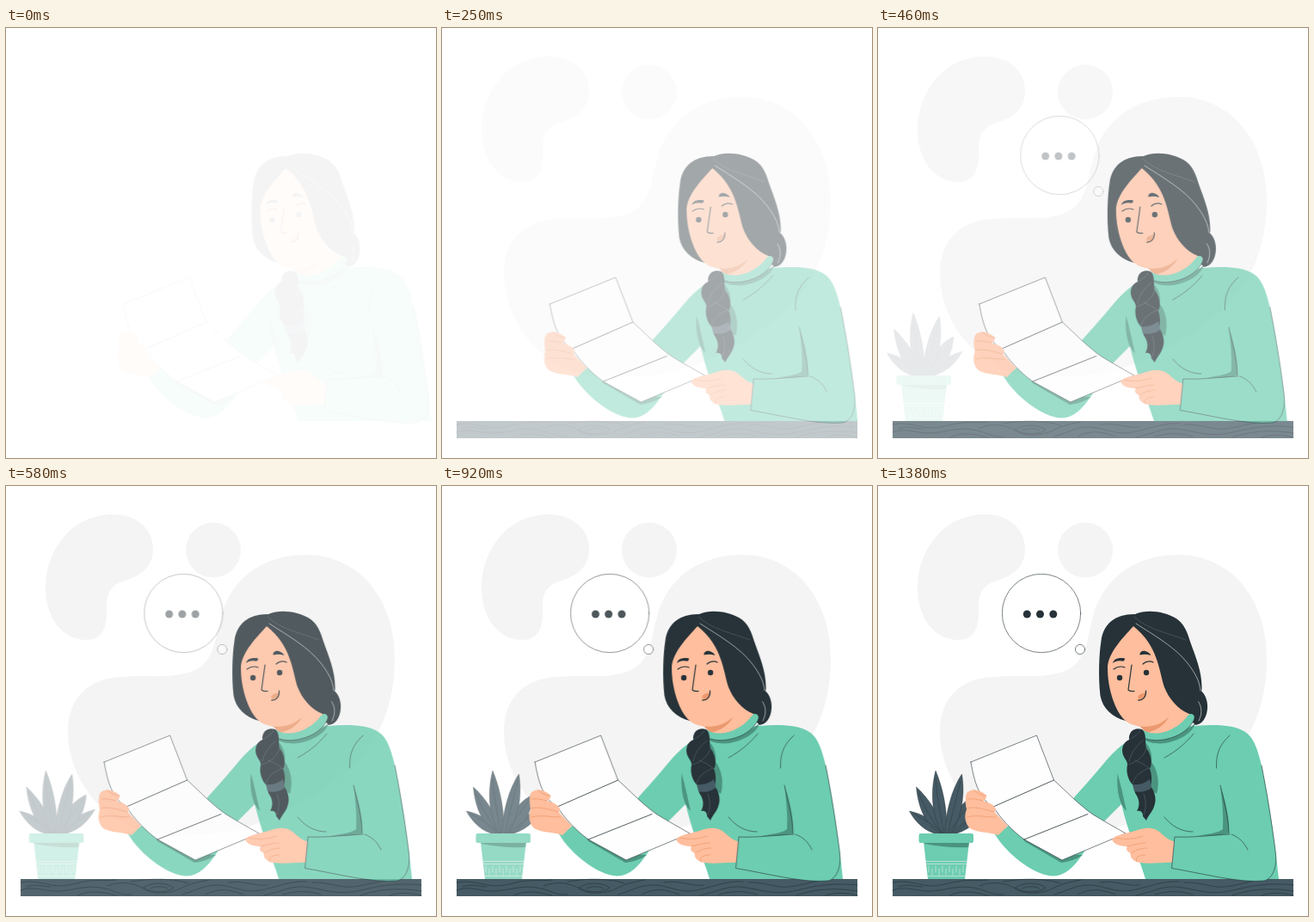
These frames come from a looping animation (500 px wide and 500 px high, 1.43 s). An HTML page:

```html
<!DOCTYPE html>
<html lang="en">
<head>
<meta charset="utf-8">
<title>Reading a letter</title>
<style>
  html, body { margin: 0; width: 100%; height: 100%; overflow: hidden; background: #fff; }
  svg { display: block; width: 100%; height: 100%; }

  .scene > g { animation: 1430ms linear infinite both; }
  .scene > .room { animation-name: appear; }
  .scene > .woman { animation-name: woman; }
  .scene > .bubble { animation-name: bubble; }
  .scene > .plant { animation-name: plant; }

  @keyframes appear {
    0%, 5.3% { opacity: 0; }
    43.2%, 100% { opacity: 1; }
  }
  /* starts 30 ms into a one second ease-out */
  @keyframes woman {
    0% { opacity: .05; transform: translateX(28.5px); animation-timing-function: cubic-bezier(.128, .213, .626, 1); }
    67.83%, 100% { opacity: 1; transform: none; }
  }
  @keyframes bubble {
    0%, 19.23% { opacity: 0; transform: translateX(30px); animation-timing-function: ease-out; }
    89.16%, 100% { opacity: 1; transform: none; }
  }
  @keyframes plant {
    0%, 26.57% { opacity: 0; transform: translateX(-30px); animation-timing-function: ease-out; }
    96.5%, 100% { opacity: 1; transform: none; }
  }

  .blob { fill: #f4f4f4; }
  .slate { fill: #455a64; }
  .ink { fill: #263238; }
  .green { fill: #6ccdb0; }
  .shade { fill: #4a947f; }
  .skin { fill: #ffbe9d; }
  .blush { fill: #eb996e; }
  .paper { fill: #fefefe; }
  .line { fill: none; stroke: #263238; stroke-width: .6; stroke-linecap: round; stroke-linejoin: round; }
  .fold { stroke-width: .8; }
  .bold { stroke-width: 1.2; }
  .crease { stroke: #eb996e; stroke-width: .7; }
  .strand { stroke: #56666e; }
  .light { stroke: #e8ecee; }
</style>
</head>
<body>
<svg class="scene" viewBox="0 0 500 500">
  <g class="room">
    <g class="blob">
      <path d="M124 33C153 33 172 51 171 75C170 98 152 106 136 111C121 116 117 126 117 140C118 160 115 179 93 179C65 179 46 152 46 119C46 75 76 33 124 33Z"/>
      <circle cx="241" cy="74.5" r="32"/>
      <path d="M349 80C411 80 452 132 452 200C452 285 410 335 330 375C285 402 230 409 180 405C120 400 72 346 72 285C72 246 97 224 132 222C163 220 192 224 215 216C243 206 243 178 250 152C260 112 294 80 349 80Z"/>
    </g>
    <path class="slate" d="M17 457H483V477H17Z"/>
    <path class="line" d="M17 461C40 456 52 470 78 463S112 460 128 458M17 470C34 464 44 472 62 471S92 464 110 467S130 476 146 475M24 466C34 462 42 466 52 466M84 476C100 468 118 474 128 476M118 465C136 458 150 463 158 467C168 476 192 474 203 468C214 462 226 460 236 458M160 467C166 461 186 460 195 467C190 473 168 474 160 467ZM168 468C174 465 182 465 188 468M146 460C166 456 196 456 212 462M205 475C222 470 230 464 246 464S276 474 296 470S330 459 350 460M232 475C250 466 262 470 276 475M258 461C276 458 290 466 304 464M300 476C320 472 330 465 346 466S380 475 402 472S440 460 483 464M356 461C376 460 388 468 404 466S430 460 440 459M322 475C340 470 352 471 366 475M412 476C430 470 452 466 483 471M446 476C458 472 470 473 483 476"/>
  </g>

  <g class="bubble">
    <g class="line" style="fill:#fff">
      <circle cx="190" cy="148" r="45.7"/>
      <circle cx="235" cy="190" r="5.6"/>
    </g>
    <g class="ink">
      <circle cx="173.3" cy="149" r="4.5"/>
      <circle cx="188.5" cy="149" r="4.5"/>
      <circle cx="203.800" cy="149" r="4.5"/>
    </g>
  </g>

  <g class="plant">
    <g class="line" style="fill:#455a64;stroke-width:.4">
      <path d="M78 406C58 406 44 392 36.500 378C52 381 68 390 78 406Z"/>
      <path d="M80 406C94 388 110 380 124 376C116 391 104 402 84 406Z"/>
      <path d="M76 406C56 396 47 376 44.500 350C58 362 72 382 78 406Z"/>
      <path d="M80 406C84 384 98 366 114 359C112 382 102 398 84 406Z"/>
      <path d="M77 406C63 388 60 358 67 331C76 352 82 382 79 406Z"/>
      <path d="M78 406C78 380 86 352 97.500 335C102 362 96 388 84 406Z"/>
      <path d="M76 405C64 393 52 387 41 381M75 405C62 388 52 370 47 356M77 405C72 380 68 358 67 340M81 405C86 382 92 360 96 343M82 405C92 388 102 376 111 364M84 405C96 394 108 386 118 380"/>
    </g>
    <path class="green" d="M53 414H106L101 457H58Z"/>
    <path class="shade" d="M53 414H106L105 420C88 421 70 419 54 416Z"/>
    <rect class="green" x="47.5" y="404" width="63.5" height="11" rx="2"/>
    <g class="line light">
      <path d="M56 436.500H103M56 439.500H103M58 453.500H101"/>
      <path d="M59 442V449M63 445V452M67 442V449M71 445V452M75 442V449M79 445V452M83 442V449M87 445V452M91 442V449M95 445V452M99 442V449"/>
    </g>
  </g>

  <g class="woman">
    <!-- far arm and body -->
    <path class="green" d="M294 295C272 306 262 326 229 361L196 405L152 395L136 405C150 428 180 452 203 453.500C217 454 228 443 238 428L262 391L285 368L300 310Z"/>
    <path class="shade" d="M166 405L170 413L213 438C222 437 231 434 238 429L214 428Z"/>
    <path class="green" d="M294 295C312 286 340 280 368 279C390 277 414 277 427 286C438 293 442 309 446 325C454 362 462 415 466 457H311C302 428 286 392 279 350C276 325 282 304 294 295Z"/>
    <path class="shade" d="M278.500 334C277 355 281 371 289 378C286 365 283 350 278.500 334Z"/>
    <path class="shade" d="M311 293C330 297 352 290 369 276C366 286 352 296 334 299C326 300 316 299 311 296Z"/>
    <path class="shade" d="M311 298C317 304 319 313 318 321C325 330 328 344 324 358L312 350Z"/>
    <path class="line" d="M333 316C346 309 358 299 367 288M333 385C342 396 353 402 366 402M409 290C397 301 393 311 393.500 328"/>

    <!-- back hair, neck and collar -->
    <path class="ink" d="M370 235C380 238 384 250 383 259C382 270 377 277 369 278L358 266Z"/>
    <path class="line light" d="M372 250C377 257 377 265 373 273"/>
    <path class="skin" d="M308 268L310 288C326 292 352 284 363 267L352 238Z"/>
    <path class="blush" d="M304 279C322 279 333 271 341 261C338 274 327 284 312 287Z"/>
    <path class="green" d="M307 283C322 294 349 284 361 266C364 264 368 265 368 270C366 278 356 287 346 291C334 296 321 297 312 294Z"/>
    <path class="line" d="M312 294C321 297 334 296 346 291C356 287 366 278 368 270"/>

    <!-- face -->
    <path class="skin" d="M297 160C278 172 265 190 266 212C267 238 274 264 289 274C300 282 322 282 334 272C346 264 352 250 345 232L322 172Z"/>
    <path class="ink" d="M298 162C281 180 267 196 267 212C267 236 276 263 288 273C272 269 261 258 258.500 244C256 222 257 195 259.500 180C262 160 276 149 298 149Z"/>
    <path class="ink" d="M297 163C290 160 290 152 299 149C313 143 332 146 345 153C356 159 360 171 363 181C369 198 377 216 376.500 236C375 249 369 258 362 265C349 260 338 247 333 234C327 216 326 186 297 163Z"/>
    <path class="line strand" d="M298 152C313 167 338 171 358 179"/>
    <path class="line light" d="M300 160C322 174 346 188 360 206C370 219 374 228 375 238"/>
    <path class="ink" d="M273 206C274 201 280 199 287 200.500C287 203 286 204 283 203.500C278 203 276 204 273 206ZM304.500 196.500C304 192.500 308 191 311 192C314 193 317 195 317 197C313 195.500 309 195.500 304.500 196.500Z"/>
    <path class="line bold" d="M274 213C278 210 282 209 287 211M308 207C311 204 316 203 320 205M295 208L291 237C293 239 295 239 298 238.500"/>
    <circle class="ink" cx="281" cy="223" r="3.2"/>
    <circle class="ink" cx="312" cy="217" r="3.2"/>
    <path class="blush" d="M302 245C304 241 309 241 311 240C312 245 308 249 304 249Z"/>
    <path class="line bold" d="M302.500 249C308 249.500 312 245 311.500 238"/>

    <!-- braid -->
    <path class="ink" d="M307 283C298 280 291 286 292 295C284 298 282 308 286 315C288 319 290 320 290 324C288 333 291 343 297 348L299 357C304 364 305 371 301 378C306 377 308 380 308 384L312 389C314 383 320 378 321.500 371C324 365 322 355 317 349C319 341 318 334 316 329C320 322 317 311 312 305C310 298 313 288 307 283Z"/>
    <path class="slate" d="M296 347C304 348 311 345 316 341L318 351C313 355 305 357 298 355Z"/>
    <path class="line strand" d="M292 295C299 291 303 288 305 284M292 320C294 309 301 302 308 296M291 324C301 321 309 315 312 305M296 346C298 337 306 332 315 328M299 319C306 322 312 325 316 329M309 358C312 366 312 374 309 382"/>

    <!-- letter -->
    <g class="line">
      <path class="paper" d="M108 321L184.500 290L204.500 342C220 356 234 371 250 382C263 390 276 397 288 404L214 435L170 411C155 400 143 387 134 373C118 364 112 345 108 321Z"/>
      <path class="fold" d="M134 373L204.500 342M170 411L244 381.500"/>
    </g>

    <!-- hands -->
    <path class="skin" d="M104 356C110 351 121 354 126 360C126 363 125 365 122 366C128 368 134 370 136 374C138 376 137 378 135 379C140 383 144 389 151 395L140 406C128 402 114 403 107 398C101 393 100 383 103 376C101 368 101 360 104 356Z"/>
    <path class="line crease" d="M105 364C111 363 117 365 122 366M103 375C112 372 124 376 135 379M104 385C114 382 124 385 137 385M111 353C114 356 119 360 126 360"/>
    <path class="skin" d="M272 411C277 405 289 404 299 401C308 397 320 396 327 402C333 407 338 412 346 414V438C332 437 318 440 305 438C297 437 292 431 294 427C289 425 288 422 290 419C282 419 274 417 272 411Z"/>
    <path class="line crease" d="M290 419C298 417 305 415 311 415M294 427C302 422 308 421 313 421M276 409C288 412 300 410 308 407M301 437C298 432 304 429 311 429"/>

    <!-- near sleeve -->
    <path class="green" d="M345 408C366 409 388 406 409 405C432 404 452 400 462 424C465 444 459 457 449 459C420 462 375 450 341.500 444.500Z"/>
    <path class="shade" d="M398 348C404 366 409 386 408 404C396 407 383 407 371 406.500C385 405 396 403 401 399C402 382 400 365 398 348Z"/>
    <path class="line" d="M409 405C388 406 366 409 345 408L341.500 444.500C375 450 420 462 449 459C458 457 465 444 462 424C458 392 452 355 446 325M411 405C421 409 426 415 430 423M398 348C402 366 408 386 408 404"/>
  </g>
</svg>
</body>
</html>
```
